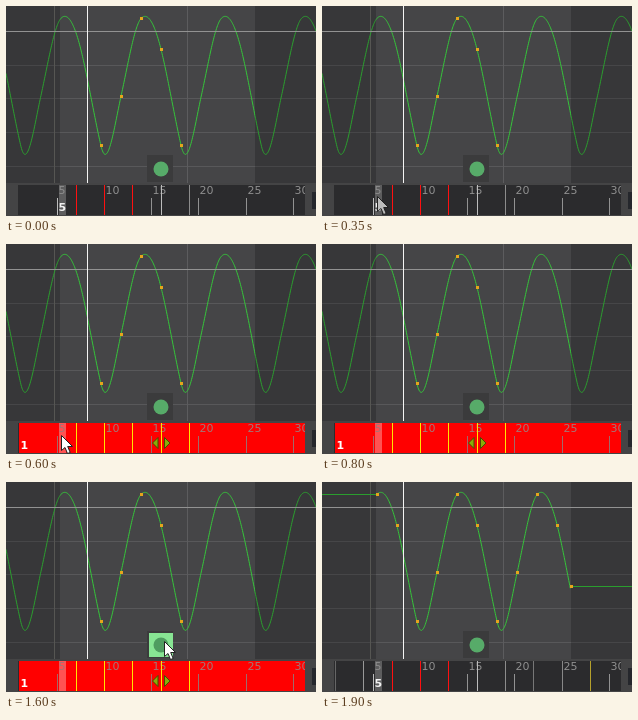
An HTML page with a canvas that plays this animation: 310 by 210 pixels, repeating every 2500 ms.

```html
<!DOCTYPE html>
<html lang="en">
<head>
<meta charset="utf-8">
<title>Curve baking</title>
<style>
  html, body { margin: 0; width: 100%; height: 100%; overflow: hidden; background: #444; }
  canvas { display: block; width: 310px; height: 210px; }
</style>
</head>
<body>
<canvas id="stage" width="310" height="210"></canvas>
<script>
const ctx = document.getElementById('stage').getContext('2d');
const LOOP = 2500;
const SELECT = 600, HOVER = 1300, PRESS = 1600, BAKE = 1650, LEAVE = 1750, DESELECT = 1900;
const FONT = '11px "DejaVu Sans", sans-serif';

// Pointer steps: time, x, y; a step without a place hides it.
const POINTER = [
  [0], [100, 297, 200], [150, 232, 198], [200, 166, 196], [250, 110, 193],
  [300, 71, 191], [350, 55, 190], [450, 56, 191], [500, 55, 191],
  [750, 117, 199], [800], [1300, 165, 160], [1350, 162, 159], [1400, 160, 159],
  [1450, 158, 159], [1650, 164, 170], [1700, 172, 186], [1750]
];

// One cycle of keys: value and slope.
const CYCLE = [[12, -1.1], [43, 4], [139, 4.3], [90, -4.5]];
const FIRST = 54.8, GAP = 20.05;

function rect(x, y, w, h, color) {
  ctx.fillStyle = color;
  ctx.fillRect(x, y, w, h);
}

function label(text, x, y, color, bold) {
  ctx.font = (bold ? 'bold ' : '') + FONT;
  ctx.fillStyle = color;
  ctx.fillText(text, x, y);
}

function polygon(points, fill, stroke) {
  ctx.beginPath();
  points.forEach(([x, y]) => ctx.lineTo(x, y));
  ctx.closePath();
  ctx.fillStyle = fill;
  ctx.fill();
  ctx.strokeStyle = stroke;
  ctx.lineWidth = 1;
  ctx.stroke();
}

const keyAt = i => CYCLE[((i % 4) + 4) % 4];

function curveY(x) {
  const p = (x - FIRST) / GAP, i = Math.floor(p), t = p - i;
  const [a, sa] = keyAt(i), [b, sb] = keyAt(i + 1);
  const m = sa * GAP, n = sb * GAP, d = b - a;
  return a + m * t + (3 * d - 2 * m - n) * t * t + (m + n - 2 * d) * t * t * t;
}

function graph(baked) {
  rect(0, 0, 310, 177, '#454547');
  for (const y of [59, 92, 126, 160]) rect(0, y, 310, 1, '#58585a');
  rect(48, 0, 1, 177, '#6c6c68');
  rect(181, 0, 1, 177, '#5c5c5e');

  const from = baked ? FIRST : 0, to = baked ? 248.5 : 310;
  ctx.beginPath();
  if (baked) ctx.moveTo(0, 12.5);
  for (let x = from; x <= to; x += 0.5) ctx.lineTo(x, curveY(x) + 0.5);
  if (baked) {
    ctx.lineTo(248.5, 104.5);
    ctx.lineTo(310, 104.5);
  }
  ctx.strokeStyle = '#35c53a';
  ctx.lineWidth = 1;
  ctx.stroke();

  rect(0, 0, 54, 177, 'rgba(0,0,0,.2)');
  rect(249, 0, 61, 177, 'rgba(0,0,0,.2)');
  rect(0, 25, 310, 1, '#929292');
  rect(81, 0, 1, 177, '#f4f4f4');

  const start = baked ? 0 : 2, end = baked ? 9 : 6;
  for (let i = start; i <= end; i++) keyDot(FIRST + i * GAP, keyAt(i)[0]);
  if (baked) keyDot(248.5, 104);
}

function keyDot(x, y) {
  rect(Math.round(x) - 1, y - 1, 3, 3, '#e5a51c');
}

function button(t) {
  const over = t >= HOVER && t < LEAVE;
  const down = t >= PRESS && t < BAKE;
  rect(141, 149, 26, 27, '#3b3b3c');
  if (down) rect(143, 151, 24, 24, '#87e493');
  ctx.beginPath();
  ctx.arc(155, 163, 7.5, 0, Math.PI * 2);
  ctx.fillStyle = down ? '#4f9c60' : over ? '#a5e5b5' : '#57ab69';
  ctx.fill();
}

const frameX = f => Math.floor(51.5 + (f - 5) * 9.43);

function timeline(t) {
  const red = t >= SELECT && t < DESELECT;
  const done = t >= DESELECT;
  rect(0, 177, 310, 33, '#444445');
  rect(306, 186, 4, 17, '#25272c');

  ctx.save();
  ctx.beginPath();
  ctx.rect(12, 179, 287, 30);
  ctx.clip();
  rect(12, 179, 287, 30, '#2b2b2d');
  if (red) rect(13, 179, 286, 30, '#ff0000');
  rect(53, 179, 7, 30, red ? '#ff5252' : '#5d5d5e');

  for (let f = 5; f <= 30; f += 5) {
    rect(frameX(f), 192, 1, 17, red ? '#a06a6a' : f === 5 ? '#bdbdbd' : '#929292');
    label(String(f), frameX(f) + 1.5, 188, red ? '#a57575' : '#8e8e8e');
  }
  for (let f = 7; f <= 19; f += 3) {
    const idle = f <= 13 ? '#ff1010' : f === 16 ? '#bcbcbc' : '#8c8c8c';
    rect(frameX(f), 179, 1, 30, red ? '#ffe600' : idle);
  }
  if (done) {
    rect(13, 179, 1, 30, '#666');
    rect(41, 179, 1, 30, '#999');
    rect(211, 179, 1, 30, '#777');
    rect(240, 179, 1, 30, '#888');
    rect(268, 179, 1, 30, '#b5a02c');
  }
  if (red) {
    label('1', 14.5, 205, '#fff', true);
    polygon([[152, 193.5], [152, 204.5], [146.5, 199]], '#8aac08', '#4b4a00');
    polygon([[158.5, 193.5], [158.5, 204.5], [164, 199]], '#8aac08', '#4b4a00');
  } else {
    label('5', 52.5, 205, '#f2f2f2', true);
  }
  ctx.restore();
}

function pointer(t) {
  const [, x, y] = POINTER.filter(step => step[0] <= t).pop();
  if (x === undefined) return;
  ctx.save();
  if (t >= HOVER && t < PRESS) {
    ctx.beginPath();
    ctx.rect(0, 0, 168, 176);
    ctx.clip();
  }
  ctx.translate(x + 0.5, y + 0.5);
  polygon([[0, 0], [0, 15], [3.5, 12], [6, 18], [8.7, 17], [6.2, 11], [11, 11]],
    t < SELECT ? '#bcbcbc' : '#fff', '#222');
  ctx.restore();
}

function draw(now) {
  const t = now % LOOP;
  graph(t >= BAKE);
  button(t);
  timeline(t);
  pointer(t);
}

let origin;
function tick(now) {
  if (origin === undefined) origin = now;
  draw(now - origin);
  requestAnimationFrame(tick);
}
draw(0);
requestAnimationFrame(tick);
</script>
</body>
</html>
```
